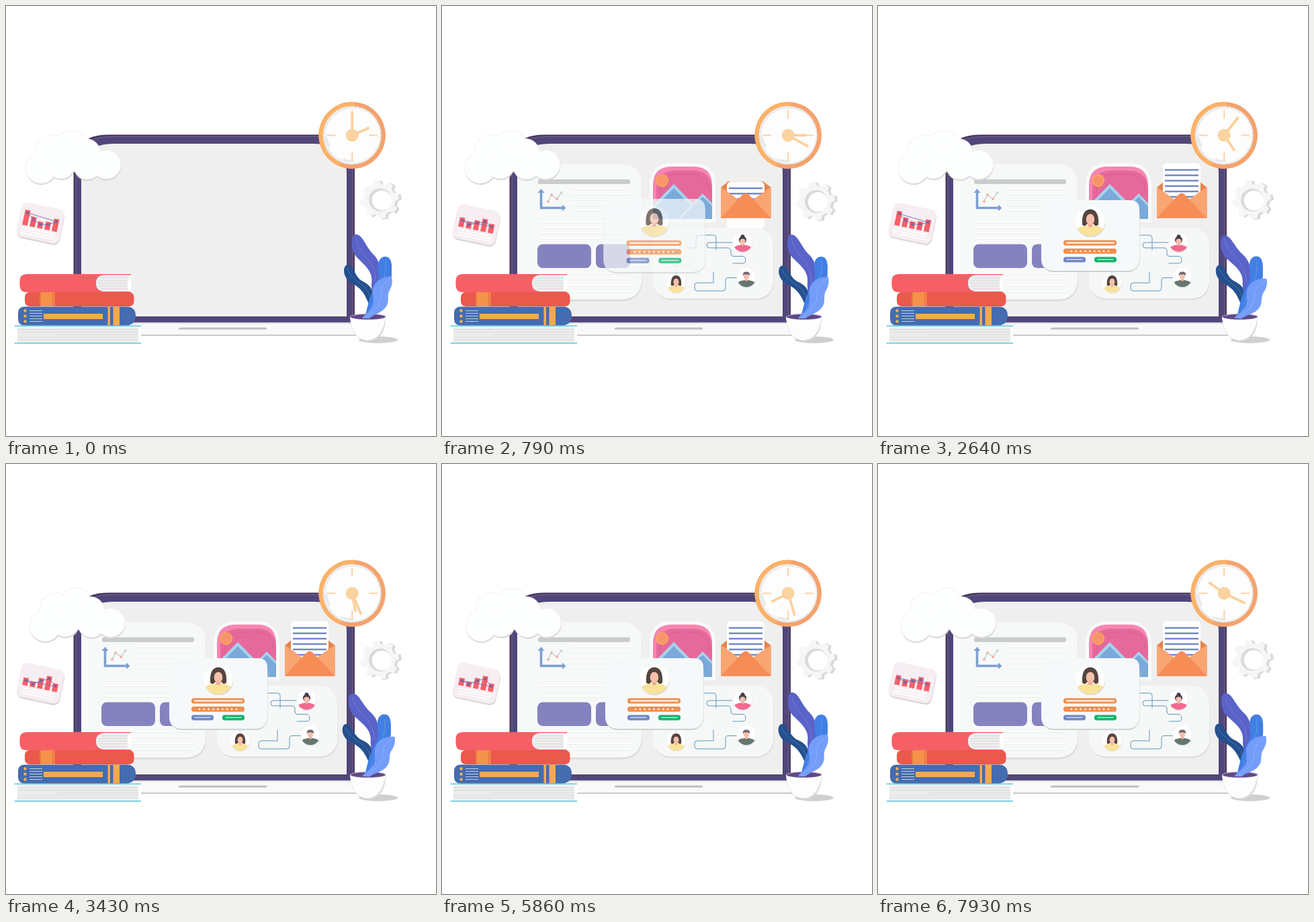
Recreate the animation shown at these times as an HTML page. Size 640x640 px, loop 8000 ms.

```html
<!DOCTYPE html>
<html lang="en">
<head>
<meta charset="utf-8">
<title>Learning desk</title>
<style>
  html, body { margin: 0; width: 100%; height: 100%; overflow: hidden; background: #fff; }
  svg { display: block; width: 100vw; height: 100vh; }
  .line { fill: none; stroke-linecap: round; stroke-linejoin: round; }
</style>
</head>
<body>
<svg viewBox="0 0 640 640">
  <defs>
    <g id="disc">
      <circle cx=".5" cy="1.6" r="22" fill="#d3d5d6"/>
      <circle r="22" fill="#fff"/>
    </g>
    <path id="shirt" d="M-19 11Q-14 7-5 6H5Q14 7 19 11A22 22 0 0 1-19 11Z"/>
    <g id="face" fill="#f6c0ab">
      <path d="M-3 1H3V7Q0 11-3 7Z" fill="#eeaa95"/>
      <ellipse cy="-3" rx="6.3" ry="8"/>
    </g>
    <g id="woman">
      <use href="#disc"/>
      <path d="M-12 5C-13-9-9-18 0-18S13-9 12 5Q8 9 5 4H-5Q-8 9-12 5Z" fill="#54453f"/>
      <use href="#shirt" fill="#fbe29a"/>
      <use href="#face"/>
      <path d="M-7-2Q-7-11 0-12Q7-11 7-2L9-8Q6-16 0-16T-9-8Z" fill="#54453f"/>
    </g>
    <g id="bunWoman">
      <use href="#disc"/>
      <circle cy="-13" r="4.5" fill="#443c4b"/>
      <circle cy="-5" r="8.5" fill="#443c4b"/>
      <use href="#shirt" fill="#f3698f"/>
      <use href="#face"/>
      <path d="M-7-4Q-5-12 0-12T7-4Q4-8 0-8T-7-4Z" fill="#443c4b"/>
    </g>
    <g id="man">
      <use href="#disc"/>
      <use href="#shirt" fill="#66756f"/>
      <use href="#face"/>
      <path d="M-8-4Q-9-13 0-13T8-4L5-7H-5Z" fill="#6b6870"/>
    </g>
    <clipPath id="pictureClip"><path d="M314 317V267Q314 239 342 239H374Q402 239 402 267V317Z"/></clipPath>
  </defs>

  <!-- laptop -->
  <path d="M100.500 471V241Q101 191.500 152 191.500H468Q519 192 519 241V471Z" fill="#4b3a5f"/>
  <path d="M104 471V243Q104 194.500 154 194.500H466Q516 195 516 243V471Z" fill="#51467a" stroke="#8379a3" stroke-width=".7"/>
  <path d="M112 462V250Q113 205 160 205H460Q507 206 507 250V462Z" fill="#efefef"/>
  <path d="M80 471H540V482Q540 490 530 490H90Q80 490 80 482Z" fill="#f9f9f9"/>
  <path d="M100 472H519" stroke="#d6d4da" stroke-width="1.500"/>
  <path d="M90 490H528" stroke="#c9c9c9" stroke-width="2"/>
  <path class="line" d="M258.500 480H386.500" stroke="#bfbfbf" stroke-width="3.200"/>

  <g id="report">
    <path d="M112 462V250Q113 225 126 213V462Z" fill="#f7f8f8"/>
    <path d="M126 238H266Q298 238 298 270V406Q298 439.500 266 439.500H126Z" fill="#d9dbdb"/>
    <path d="M126 235.500H266Q297.500 236 297.500 268V404Q297 437 266 437H126Z" fill="#f7f9f9"/>
    <rect x="143" y="258" width="137" height="7" rx="3" fill="#cacbcb"/>
    <g class="line" stroke-width="1.600">
      <path d="M192 273H280M192 281H280M192 289H280M192 297H246M192 305H246M145 323H280M145 331H280M145 339H280M145 347H280M145 399H280M145 407H280M145 417H280M145 426H280" stroke="#e9ebeb"/>
      <path d="M192 272H280M192 280H280M192 288H280M192 296H246M192 304H246M145 322H280M145 330H280M145 338H280M145 346H280M145 398H280M145 406H280M145 416H280M145 425H280" stroke="#fff"/>
    </g>
    <path d="M147.500 277V300.500H181" fill="none" stroke="#7e9fd2" stroke-width="3.600"/>
    <path d="M142.500 278L147.500 272L152.500 278ZM179 295.500L184.500 300.500L179 305.500Z" fill="#7e9fd2"/>
    <path d="M158 291L163 281L171 287L177.500 278" fill="none" stroke="#a9b2b8"/>
    <g fill="#f2b3a5"><circle cx="158" cy="291" r="2"/><circle cx="163" cy="281" r="2"/><circle cx="171" cy="287" r="2"/><circle cx="177.500" cy="278" r="2" fill="#c8d8d0"/></g>
    <rect x="142" y="354.500" width="80" height="35.500" rx="8" fill="#8583bf"/>
    <rect x="229" y="354.500" width="51" height="35.500" rx="8" fill="#8583bf"/>
  </g>

  <g id="picture">
    <path d="M309 322V268Q309 234 343 234H373Q407 234 407 268V322Z" fill="#f9fafa"/>
    <g clip-path="url(#pictureClip)">
      <path d="M310 230H410V320H310Z" fill="#f786b1"/>
      <path d="M319 320V273Q320 245 347 245H375Q402 246 402 275V320Z" fill="#e5699b"/>
      <path d="M325 320V278Q326 250 352 250H372Q398 252 398 278" fill="none" stroke="#d85c90"/>
      <path d="M300 311L345 265L390 311V320H300Z" fill="#a6d3ed"/>
      <path d="M300 317L345 271L390 317V320H300Z" fill="#7aa9da"/>
      <path d="M348 320L388 279L412 304V320Z" fill="#a6d3ed"/>
      <path d="M352 320L388 284L412 308V320Z" fill="#7aa9da"/>
    </g>
    <circle cx="327.700" cy="259.700" r="9.500" fill="#f9a15f"/>
    <circle cx="327.700" cy="259.700" r="7" fill="#f6946b"/>
  </g>

  <g id="mail">
    <path d="M415 270L426 261H478L489.500 270V315.500H415Z" fill="#e4834d"/>
    <g id="letter">
      <rect x="424" y="234" width="56" height="70" rx="6" fill="#fff"/>
      <path d="M427 244H477M427 252H477M427 260H477M427 268H477M427 276H477M427 284H477" stroke="#7389c5" stroke-width="2.500"/>
    </g>
    <path d="M415 269L452 296L489.500 269V315.500H415Z" fill="#f9a571"/>
    <path d="M415 315.500L447 281Q452 276 457 281L489.500 315.500Z" fill="#f68d56"/>
  </g>

  <g id="network">
    <rect x="315" y="332" width="178.500" height="105.500" rx="25" fill="#d9dbdb"/>
    <rect x="314" y="330" width="179" height="105.500" rx="25" fill="#f6f7f7"/>
    <g class="line" stroke="#5d97bd">
      <path d="M365 360H374Q378 360 378 356V345Q378 341 382 341H404Q408 341 408 345V363"/>
      <path d="M348 399V386H372" stroke="#c3ced4"/>
      <path d="M432 352H398Q394 352 394 356T398 360H425Q430 360 430 365V368Q430 372.500 434 372.500H447Q452 373 452 378T447 383H433"/>
      <path d="M404 396V412H380Q376 412 376 416V420Q376 424 380 424H418Q422 424 422 420V409Q422 404.500 426 404.500H440"/>
    </g>
    <use href="#bunWoman" transform="translate(447.500 351.500) scale(.65)"/>
    <use href="#woman" transform="translate(348.500 412.500) scale(.64)"/>
    <use href="#man" transform="translate(453 404) scale(.65)"/>
  </g>

  <g id="login">
    <rect x="243" y="292" width="146.500" height="104" rx="18" fill="#cfd2d2"/>
    <path d="M251 289H375Q389 289 389 303V375Q389 394 370 394H263Q243 394 243 374V297Q243 289 251 289Z" fill="#f6f9f9"/>
    <use href="#woman" transform="translate(316 320.500)"/>
    <g fill="#f08f4e">
      <rect x="276" y="348.500" width="79" height="8" rx="3.500"/>
      <rect x="276" y="361" width="79" height="7.800" rx="3.500"/>
    </g>
    <rect x="276" y="373.500" width="33" height="8" rx="3.500" fill="#7088c7"/>
    <rect x="322" y="373.500" width="33" height="8" rx="3.500" fill="#12b56d"/>
    <g class="line" stroke="#fff">
      <path d="M281 352.400H351" stroke-width="2"/>
      <path d="M288 365H344" stroke-width="2.600" stroke-dasharray="0 6.870"/>
      <path d="M281 377.400H304M327 377.400H350" stroke-width="1.200" opacity=".8"/>
    </g>
  </g>

  <g id="cloud"></g>

  <!-- clock -->
  <g transform="translate(515.200 192.500)">
    <circle r="49.700" fill="#f5a26d"/>
    <path d="M5-49.500A49.700 49.700 0 0 0-18 46.300Z" fill="#fbb267"/>
    <circle r="43.500" fill="#ebebed"/>
    <circle cx=".8" cy=".3" r="40.500" fill="#fdfdfd"/>
    <path d="M-39 2A39 39 0 0 0-34 18M-37 5A38 38 0 0 0-33 17M-17 35A39 39 0 0 0 2 39M-12 36A38 38 0 0 0 2 37.500" fill="none" stroke="#bfc0c8" stroke-width=".7" stroke-dasharray="3 .8"/>
    <path d="M0-38V-25M0 25V38M-38 0H-25M25 0H38" stroke="#fad3a4" stroke-width="2"/>
    <g class="line" stroke="#fbd09b" stroke-width="3.700">
      <path id="hour" d="M0 0V-26.500"/>
      <path id="minute" d="M0 0V-33"/>
    </g>
    <circle r="9.500" fill="#fbd3a0"/>
  </g>

  <g id="gear">
    <path class="cog" transform="translate(560 289)" fill="#d9d9da"/>
    <path class="cog" transform="translate(556 288)" fill="#f6f6f6"/>
    <circle cx="557" cy="288.500" r="17" fill="#dadadb"/>
    <circle cx="559.500" cy="289.200" r="14.700" fill="#fff"/>
  </g>

  <g id="chart">
    <g transform="translate(51 323.500) rotate(12)">
      <rect x="-31.500" y="-24.500" width="65" height="52" rx="9" fill="#d8d4d8"/>
      <rect x="-32.500" y="-26.500" width="65" height="52" rx="9" fill="#f6eef2"/>
      <path d="M-25 11.500H25M-25 15.500H25M-25 19.500H25" stroke="#fff" stroke-width="1.700"/>
      <path id="bars" stroke="#f75f68" stroke-width="7.800"/>
      <path id="trend" fill="none" stroke="#6d6aa8" stroke-width=".8"/>
      <path id="dots" class="line" stroke="#77609f" stroke-width="4"/>
    </g>
  </g>

  <!-- books -->
  <path d="M186 399H31Q20.500 399 20.500 409V416Q20.500 426 31 426H186Z" fill="#f75f66"/>
  <path d="M186.500 400.500H147Q134 401 134 412.500T147 425H186.500Z" fill="#fff"/>
  <path d="M181 400.500H147Q134 401 134 412.500T147 425H181Z" fill="#ededee"/>
  <path d="M142 404.500H181M138 408.500H181M138 412.500H181M138 416.500H181M142 420.500H181" stroke="#dadadd" stroke-width=".8"/>
  <rect x="28" y="426" width="162.500" height="21" rx="7" fill="#e9594c"/>
  <path d="M50 426H72.500V447H50Z" fill="#f5934b"/>
  <path d="M51 426V447M70 426V447" stroke="#e7723f" stroke-width="1.500"/>
  <path d="M28 447.500H180Q193 448 193 461T180 475.500H28Q18 475.500 18 466V457Q18 447.500 28 447.500Z" fill="#446cb0"/>
  <path d="M56 458H144V466H56ZM151.500 447.500H155V475.500H151.500ZM159.500 447.500H169V475.500H159.500Z" fill="#f4aa4c"/>
  <path class="line" d="M28.500 453.500V453.600M28.500 461.500V461.600M28.500 469.500V469.600" stroke="#f4b25a" stroke-width="4.400"/>
  <path d="M35 453.500H54M35 457.500H54M35 461.500H54M35 465.500H54M35 469.500H54" stroke="#c3d0e6"/>
  <path d="M12 476H201V502H12Z" fill="#fff"/>
  <path d="M17 478H197V500.500H17Z" fill="#ececec"/>
  <path d="M17 481.500H197M17 485.500H197M75 489H197M17 493H197M17 497H197" stroke="#d9d9db" stroke-width=".8"/>
  <path d="M12.500 476.300H201M12.500 501.800H201" stroke="#56c6de" stroke-width="1.400"/>

  <!-- plant -->
  <ellipse cx="554" cy="496.800" rx="29" ry="5" fill="#cfcfd0"/>
  <path d="M512 462H565.500Q564 498 540 499Q514 498 512 462Z" fill="#d8d8dc"/>
  <path d="M512 462H565Q561 496 538 497.500Q515 497 512 462Z" fill="#fdfdfd"/>
  <ellipse cx="538.700" cy="462.500" rx="26.700" ry="4.500" fill="#b79bc9"/>
  <ellipse cx="538.700" cy="462.700" rx="25.500" ry="3.600" fill="#5d4a86"/>
  <g class="line" stroke-width=".6">
    <g id="darkLeaf">
      <path d="M508 385C500 388 502 404 512 411C525 418 533 424 540 444L546 436C548 418 538 414 528 408C518 400 518 386 508 385Z" fill="#24508f"/>
      <path d="M508 390Q513 404 527 413T543 437" stroke="#5f83b5"/>
    </g>
    <g id="purpleLeaf">
      <path d="M520 340C513 342 512 362 522 374C536 388 547 396 544 414L545 440L555 418C559 395 558 381 547 370C534 357 531 339 520 340Z" fill="#5a63c8"/>
      <path d="M521 346Q523 360 537 375T550 412" stroke="#8489dc"/>
    </g>
    <g id="blueLeaf">
      <path d="M564 373C553 374 553 388 555 398C557 410 547 420 541 436L534 463L550 455C560 440 575 420 574 395C575 380 572 373 564 373Z" fill="#427fe4"/>
      <path d="M565 380Q567 400 558 415T542 455" stroke="#75a4f2"/>
    </g>
    <g id="lightLeaf">
      <path d="M574 403C565 402 552 406 547 418C543 431 550 435 546 446C541 456 533 459 530 465H541C548 458 560 457 566 447C571 440 567 432 570 425C574 418 576 412 574 403Z" fill="#749dfa"/>
      <path d="M572 406Q557 415 558 428T550 451L536 464" stroke="#9dbbfc"/>
    </g>
  </g>
</svg>
<script>
const LOOP = 8000, BOB = 2390, SWAY = 6000;
const $ = id => document.getElementById(id);
const clamp = x => Math.min(1, Math.max(0, x));
const swing = (t, period) => (1 - Math.cos(2 * Math.PI * t / period)) / 2;
const mix = (a, b, k) => a + (b - a) * k;
const place = (id, transform) => $(id).setAttribute('transform', transform);

// Cloud: the same lobes as shadow, rim and body
const lobes = [[52, 241, 22.5], [68, 216, 24], [98, 207, 22], [119, 219, 21],
  [149.5, 236, 21], [82, 237, 19.5], [121, 238, 19.5], [100, 226, 19]];
$('cloud').innerHTML = [[.5, 2.2, .6, '#d5d6d7'], [0, 0, 1, '#f0f1f1'], [0, 0, 0, '#fdfefe']]
  .map(([dx, dy, grow, fill]) => `<g fill="${fill}">` + lobes.map(([x, y, r]) =>
    `<circle cx="${x + dx}" cy="${y + dy}" r="${r + grow}"/>`).join('') + '</g>').join('');

// Cog outline with eight teeth
const cog = [];
for (let tooth = 0; tooth < 8; tooth++) {
  for (const [offset, radius] of [[-.25, 23.5], [-.14, 29], [.14, 29], [.25, 23.5]]) {
    const angle = tooth * Math.PI / 4 - .17 + offset;
    cog.push([radius * Math.cos(angle), radius * Math.sin(angle)].map(n => n.toFixed(2)));
  }
}
document.querySelectorAll('.cog').forEach(path => path.setAttribute('d', `M${cog.join('L')}Z`));

const barsLow = [23, 15, 10, 12, 19], barsHigh = [11, 8, 16, 21.5, 12], BASE = 7.5;

function drawChart(k) {
  const bars = barsLow.map((h, i) => [-22 + 11.2 * i, BASE - mix(h, barsHigh[i], k)]);
  $('bars').setAttribute('d', bars.map(([x, y]) => `M${x} ${BASE}V${y}`).join(''));
  const points = bars.map(([x, y]) => [x, y + 4]);
  $('trend').setAttribute('d', `M${points.join('L')}Z`);
  $('dots').setAttribute('d', points.map(([x, y]) => `M${x} ${y}h.01`).join(''));
}

// Panels: start, duration, centre of scaling
const panels = {
  report: [70, 330, 212, 337], picture: [190, 330, 358, 278], mail: [280, 330, 452, 289],
  network: [380, 330, 403, 383], login: [430, 500, 316, 341.5]
};

function draw(t) {
  const bob = swing(t, BOB), sway = swing(t, SWAY);

  for (const [id, [start, duration, x, y]] of Object.entries(panels)) {
    const shown = clamp((t - start) / duration);
    const scale = id === 'login' ? mix(1.13, 1, shown) : 1;
    $(id).setAttribute('opacity', shown);
    place(id, `translate(${x} ${y}) scale(${scale}) translate(${-x} ${-y})`);
  }
  place('letter', `translate(0 ${52 * (1 - swing(clamp((t - 500) / 600), 2))})`);

  place('hour', `rotate(${66 + t * .0302})`);
  place('minute', `rotate(${t * .1507})`);

  place('cloud', `translate(${6.5 * bob} 0)`);
  place('gear', `translate(0 ${3.4 * bob})`);
  place('chart', `translate(0 ${3.4 * bob})`);
  drawChart(bob);

  place('darkLeaf', `rotate(${-3.2 * bob} 545 440)`);
  place('purpleLeaf', `rotate(${-3.3 * sway} 547 440)`);
  place('blueLeaf', `rotate(${-1 * sway} 540 462)`);
  place('lightLeaf', `rotate(${4.6 * sway} 535 465)`);
}

const origin = performance.now();
function tick() {
  draw((performance.now() - origin) % LOOP);
  requestAnimationFrame(tick);
}
tick();
</script>
</body>
</html>
```
